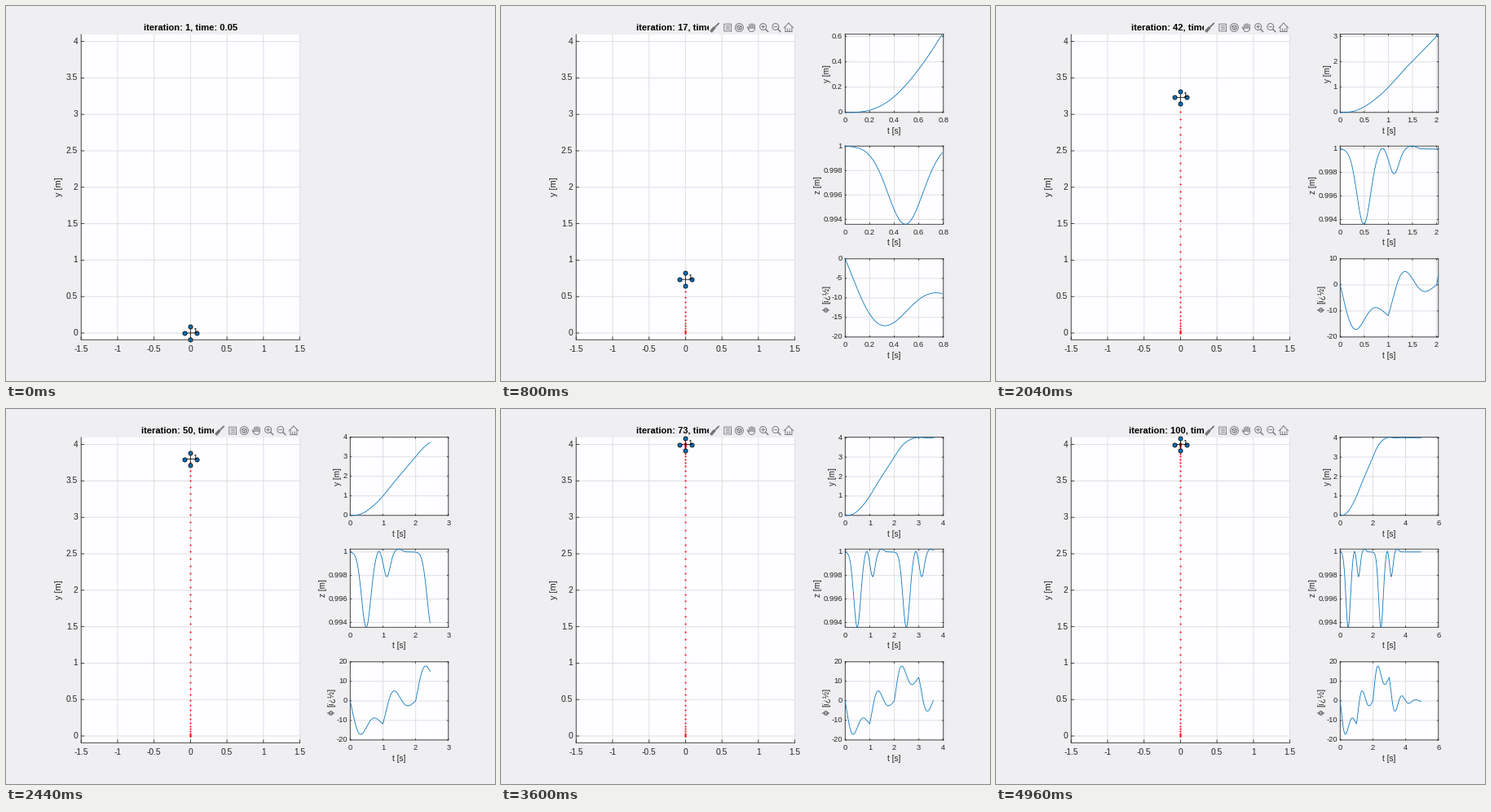
Recreate the animation shown at these times as a matplotlib script. Size 600 by 461 pixels, loop 5 s.

```python
import math

import numpy as np
import matplotlib.pyplot as plt
from matplotlib.animation import FuncAnimation
from matplotlib.patches import Rectangle

W, H, DPI = 600, 461, 100
PX = 72 / DPI                      # points per pixel
FRAMES, INTERVAL = 125, 40
STEP = 0.05                        # seconds per iteration

BACK, PAPER, GRID = "#efeef0", "#fefdff", "#dfdee0"
INK, BLUE, RED, ICON = "#262626", "#0072bd", "#ff1420", "#747476"

plt.rcParams["font.family"] = ["Liberation Sans", "DejaVu Sans"]
fig = plt.figure(figsize=(W / DPI, H / DPI), dpi=DPI, facecolor=BACK)
ax = fig.add_axes([0, 0, 1, 1])
ax.set_xlim(0, W)
ax.set_ylim(H, 0)
ax.axis("off")


# ---- flight model -------------------------------------------------------

DT = 0.001
T = np.arange(5101) * DT


def roll_step(t):
    """Roll angle in degrees after a unit change of the wanted acceleration."""
    s = np.maximum(t, 0)
    swing = np.exp(-1.75 * s) * (5.17 * np.sin(7.48 * s) - 9.07 * np.cos(7.48 * s))
    return np.where(t > 0, 11.5 + swing - 2.43 * np.exp(-8 * s), 0)


def lobe(t, centre, width):
    return np.exp(-((t - centre) / width) ** 2)


def sag(t):
    """Height lost, in mm, after the drone starts to tilt at t = 0."""
    return (6.4 * lobe(t, .49, .2) - .3 * lobe(t, .88, .1)
            + 2.1 * lobe(t, 1.12, .14) - .25 * lobe(t, 1.48, .14))


def integrate(v):
    return np.concatenate([[0], np.cumsum((v[1:] + v[:-1]) / 2) * DT])


PHI = -roll_step(T) + roll_step(T - 1) + roll_step(T - 2) - roll_step(T - 3)
Y = integrate(integrate(-PHI * 4 / 23))
Z = 1 - (sag(T) + sag(T - 2)) / 1000


# ---- drawing helpers, all in pixels -------------------------------------

def line(x, y, color=INK, width=0.8, z=3, **kw):
    return ax.plot(x, y, color=color, lw=width * PX, zorder=z, snap=False, **kw)[0]


def text(x, y, s, size, color=INK, ha="center", va="center", z=5, **kw):
    return ax.text(x, y, s, fontsize=size * PX, color=color, ha=ha, va=va,
                   zorder=z, **kw)


def box(x0, y0, x1, y1, color, z=1):
    return ax.add_patch(Rectangle((x0, y0), x1 - x0, y1 - y0, fc=color,
                                  ec="none", zorder=z))


# ---- main view ----------------------------------------------------------

M0, M1, MT, MB = 92.2, 360.6, 35, 410.3
UNIT, CX, CY = 89.6, 226.3, 402
ARM = 7.75


def draw_main():
    box(M0, MT, M1, MB, PAPER)
    for i in range(7):
        x = M0 + i * (M1 - M0) / 6
        line([x, x], [MT, MB], GRID, 1, 2)
        line([x, x], [MB, MB - 3.5])
        text(x, 422, f"{-1.5 + i / 2:g}", 10.3)
    for i in range(9):
        y = CY - i * UNIT / 2
        line([M0, M1], [y, y], GRID, 1, 2)
        line([M0, M0 + 3.5], [y, y])
        text(88, y, f"{i / 2:g}", 10.3, ha="right")
    line([M0, M0, M1], [MT, MB, MB], z=4)
    text(64.5, 222.5, "y [m]", 11, rotation=90)


draw_main()
title = text(226.5, 29.8, "", 11.1, "black", va="baseline", weight="bold")
trail = ax.plot([], [], "o", color=RED, ms=2.1 * PX, mew=0, zorder=6,
                snap=False)[0]
arms = [line([], [], "black", 0.8, 7) for _ in range(2)]
rotors = ax.plot([], [], "o", mfc=BLUE, mec="black", ms=5.1 * PX,
                 mew=0.8 * PX, zorder=8, snap=False)[0]
tag = text(0, 0, "1", 9.5, "black", z=9)


# ---- toolbar ------------------------------------------------------------

def draw_toolbar():
    parts = [box(255, 18, 361, 34.5, BACK, 10)]
    y = 26.5
    brush, tip, turn, hand, plus, minus, home = 262 + 15.15 * np.arange(7)

    def stroke(x0, y0, x1, y1, width=0.9):
        parts.append(line([x0, x1], [y0, y1], ICON, width, 11))

    def arc(x, cy, r, start=0, sweep=2 * math.pi, sides=24):
        a = start + np.linspace(0, sweep, sides + 1)
        parts.append(line(x + r * np.cos(a), cy + r * np.sin(a), ICON, 0.9, 11))

    stroke(brush, y, brush + 5, y - 5, 1.8)
    stroke(brush - 1, y + 1, brush - 3.5, y + 4, 3.5)

    arc(tip + 1, y, 6.2, math.pi / 4, sides=4)
    for dy in (-2, 0, 2):
        stroke(tip - 1, y + dy, tip + 3.5, y + dy, 0.8)

    arc(turn, y, 5)
    arc(turn, y, 3, math.pi / 6, sides=6)
    for a in math.pi * (1 / 2 + 2 / 3 * np.arange(3)):
        stroke(turn, y, turn + 3 * math.cos(a), y + 3 * math.sin(a))

    arc(hand, y + 1, 4, 0, math.pi)
    stroke(hand - 4, y + 1.5, hand - 5, y - .5, 1.3)
    for j in range(4):
        x = hand - 2.7 + 2.1 * j
        stroke(x, y + 1, x, y - 5 + abs(j - 1.4), 1.2)

    for x in (plus, minus):
        arc(x - 1, y - 1, 4)
        stroke(x + 2, y + 2, x + 5, y + 5, 1.4)
        stroke(x - 3, y - 1, x + 1, y - 1)
    stroke(plus - 1, y - 3, plus - 1, y + 1)

    stroke(home - 4, y + 5, home + 4, y + 5)
    for side in (-1, 1):
        stroke(home, y - 5.5, home + side * 5.8, y + .3)
        stroke(home + side * 4, y - 1, home + side * 4, y + 5)
        stroke(home + side * 1.3, y + 1.5, home + side * 1.3, y + 5)
    return parts


toolbar = draw_toolbar()


# ---- time plots ---------------------------------------------------------

P0, P1, PH = 422.3, 542.8, 96.1
SMALL = 9.4


def nice_axis(lo, hi):
    """Limits and ticks; a limit stays tight where rounding wastes much room."""
    span = max(hi - lo, 1e-6)
    base = 10 ** math.floor(math.log10(span / 4.3))
    step = next(m * base for m in (1, 2, 5, 10) if span / (m * base) <= 4.3)
    low, high = (math.floor(lo / step + 1e-6) * step,
                 math.ceil(hi / step - 1e-6) * step)
    if lo - low > .58 * step:
        low = lo
    if high - hi > .58 * step:
        high = hi
    if high <= low:
        high = low + step
    first, last = math.ceil(low / step - 1e-6), math.floor(high / step + 1e-6)
    return low, high, [i * step for i in range(first, last + 1)]


def label_width(s):
    return SMALL * sum({".": .278, "-": .333}.get(c, .556) for c in s)


def draw_plot(top, t, v, name):
    bottom = top + PH
    t0, t1, t_ticks = nice_axis(0, t[-1])
    v0, v1, v_ticks = nice_axis(v.min(), v.max())

    def to_x(a):
        return P0 + (a - t0) / (t1 - t0) * (P1 - P0)

    def to_y(a):
        return bottom - (a - v0) / (v1 - v0) * PH

    power = math.floor(math.log10(v1)) if name == "y" and v1 < .01 else 0
    out = [box(P0, top, P1, bottom, PAPER),
           line([P0, P1, P1, P0, P0], [top, top, bottom, bottom, top], z=4)]
    for a in t_ticks:
        x = to_x(a)
        out += [line([x, x], [top, bottom], GRID, 1, 2),
                line([x, x], [bottom, bottom - 1.5]),
                line([x, x], [top, top + 1.5]),
                text(x, bottom + 9.8, f"{a:.5g}", SMALL)]
    widest = 0
    for a in v_ticks:
        y = to_y(a)
        s = f"{a / 10 ** power:.5g}"
        widest = max(widest, label_width(s))
        out += [line([P0, P1], [y, y], GRID, 1, 2),
                line([P0, P0 + 1.5], [y, y]),
                line([P1, P1 - 1.5], [y, y]),
                text(419, y, s, SMALL, ha="right")]
    if power:
        out += [text(P0, top - 3, "×10", SMALL, ha="left", va="baseline"),
                text(P0 + 16, top - 8, str(power), 7, ha="left", va="baseline")]
    out.append(line(to_x(t), to_y(v), BLUE, 0.8, 5))
    out.append(text((P0 + P1) / 2, bottom + 23.2, "t [s]", 10))

    x, mid = 412.7 - widest, top + PH / 2
    if name == "φ":
        out += [text(x, mid - 4, "[ï¿½]", 10, rotation=90),
                text(x, mid + 14, "\u03d5", 9, rotation=90,
                     family="DejaVu Serif")]
    else:
        out.append(text(x, mid, f"{name} [m]", 10, rotation=90))
    return out


PLOTS = [(34.7, Y, "y"), (172.2, Z, "z"), (310.8, PHI, "φ")]
plots = []


def draw(i):
    n = (4 * i + 1) // 5 + 1       # iterations last 50 ms on a 40 ms clock
    title.set_text(f"iteration: {n}, time: {n * STEP:.2f}")
    for part in toolbar:
        part.set_visible(n > 1)

    path = CY - UNIT * Y[np.arange(1, n + 1) * 50 + 10]
    y = path[-1]
    trail.set_data(np.full(n - 1, CX), path[:-1])
    arms[0].set_data([CX - ARM, CX + ARM], [y, y])
    arms[1].set_data([CX, CX], [y - ARM, y + ARM])
    rotors.set_data([CX - ARM, CX + ARM, CX, CX], [y, y, y - ARM, y + ARM])
    tag.set_position((CX + 6, y - 2.5))

    while plots:
        plots.pop().remove()
    if n > 1:
        seen = slice(0, (n - 1) * 50 - 9, 10)
        for top, v, name in PLOTS:
            plots.extend(draw_plot(top, T[seen], v[seen], name))
    return []


anim = FuncAnimation(fig, draw, frames=FRAMES, interval=INTERVAL,
                     init_func=lambda: draw(0), repeat=True, repeat_delay=0)
plt.show()
```
